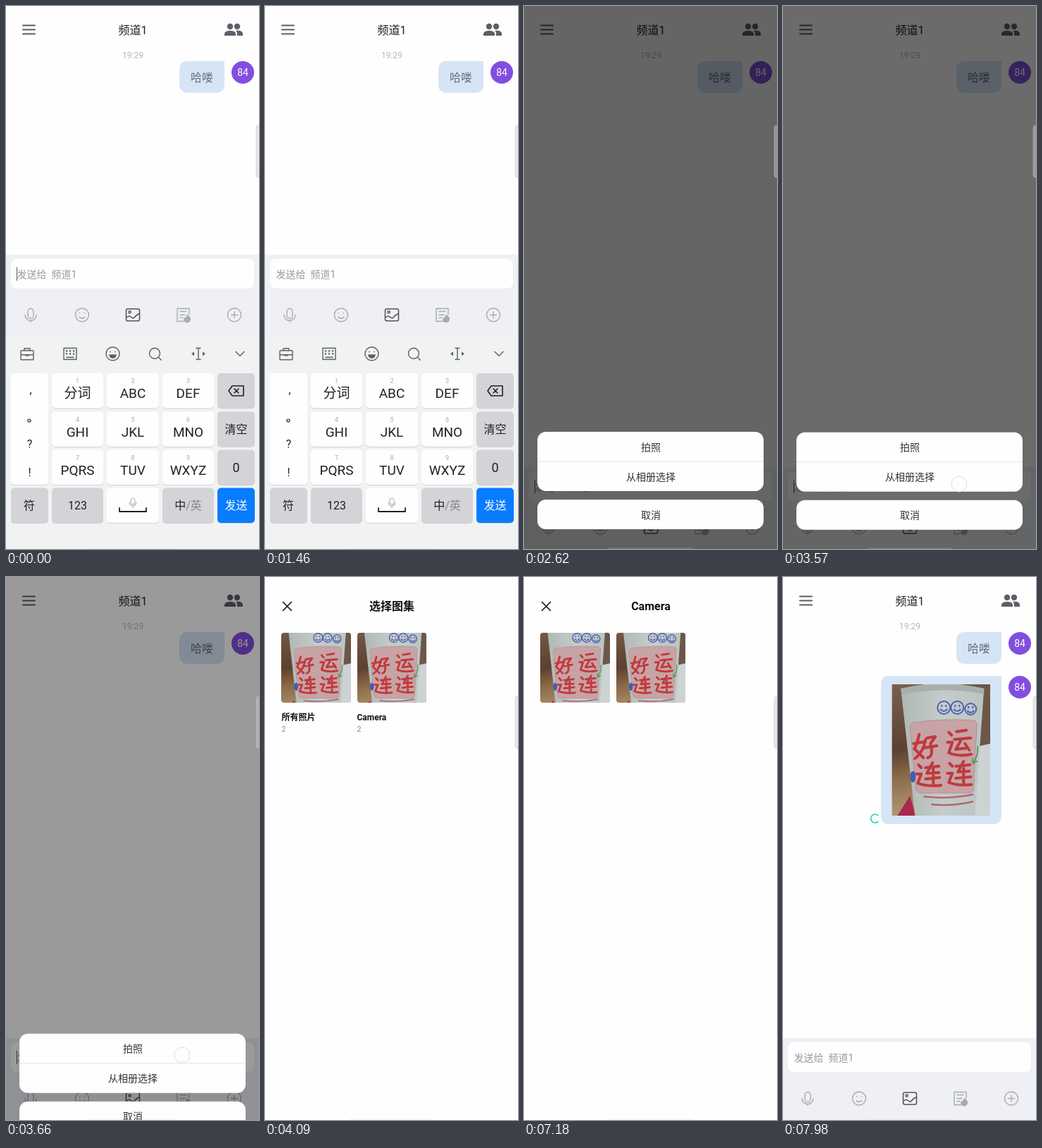
Write an HTML page that moves like this. It is 359 px wide and 769 px high and loops after 8 s.

```html
<!DOCTYPE html>
<html lang="zh-CN">
<head>
<meta charset="utf-8">
<style>
  html, body { margin: 0; width: 100%; height: 100%; overflow: hidden; background: #fefefe; }
  svg { display: block; }
  text { font-family: Roboto, "Noto Sans CJK SC", "Noto Sans CJK", sans-serif; white-space: pre; }
  .line { fill: none; stroke-linecap: round; stroke-linejoin: round; }
  .key { filter: drop-shadow(0 1px .5px #0002); }
</style>
</head>
<body>
<svg id="stage" width="359" height="769" viewBox="0 0 359 769"></svg>
<script>
const LOOP = 8000;
const BAR_DROP = 301;
const stage = document.getElementById('stage');

// Text centred vertically on y
const label = (x, y, size, text, fill = '#333', anchor = 'middle', weight = 400) =>
  `<text x="${x}" y="${y + size * 0.36}" font-size="${size}" fill="${fill}" text-anchor="${anchor}" font-weight="${weight}">${text}</text>`;
const rect = (x, y, w, h, r, fill, extra = '') =>
  `<rect x="${x}" y="${y}" width="${w}" height="${h}" rx="${r}" fill="${fill}" ${extra}/>`;
const line = (d, color, width = 1.4) =>
  `<path class="line" d="${d}" stroke="${color}" stroke-width="${width}"/>`;
const ring = r => `M${-r} 0a${r} ${r} 0 1 1 ${2 * r} 0a${r} ${r} 0 1 1 ${-2 * r} 0`;
const at = (x, y, content) => `<g transform="translate(${x} ${y})">${content}</g>`;
// Rounded on every corner but the top right one
const bubble = (x, y, w, h) =>
  `<path fill="#d6e5f6" d="M${x + 12} ${y}h${w - 12}v${h - 12}q0 12-12 12h${24 - w}q-12 0-12-12v${24 - h}q0-12 12-12"/>`;
const avatar = y => `<circle cx="336" cy="${y}" r="16" fill="#824ee0"/>` + label(336, y, 14, '84', '#fff');

const photo = `
  <symbol id="photo" viewBox="0 0 140 186" preserveAspectRatio="xMidYMid slice">
    <rect width="140" height="186" fill="url(#wood)"/>
    <path d="M110 76h30v110h-30z" fill="#cdd2d3"/>
    <path d="M126 0h14v84l-18 4z" fill="#6c5749"/>
    <path d="M8 186l18-28 8 28z" fill="#a82850"/>
    <path d="M13 6Q70-8 131 6L118 186H33z" fill="url(#cup)"/>
    <path d="M13 6Q70-8 131 6v8Q70 2 14 15z" fill="#a9b0ac"/>
    <path d="M31 54Q72 48 115 51q6 0 6 7L116 148q0 6-7 6H42q-7 0-8-7L26 62q-1-7 5-8z" fill="#c7a3a5" stroke="#b39092"/>
    <g fill="none" stroke="#4c60b5" stroke-width="2">
      <circle cx="74" cy="33" r="9"/><circle cx="93" cy="33" r="9"/><circle cx="112" cy="35" r="8"/>
      <path d="M69 35q5 6 10 0M88 35q5 6 10 0M107 37q5 6 10 0M71 29v3M77 29v3M90 29v3M96 29v3M109 31v3M115 31v3"/>
    </g>
    <ellipse cx="30" cy="131" rx="4" ry="8" fill="#405bb9"/>
    ${line('M122 88q1 14-7 24m0-7v7l6-3', '#4f9c55', 1.8)}
    ${line('M39 71q-4 17-7 20l13 13M48 78q-3 18-15 27M31 84l17-3M50 76l12-2-7 10q5 18-4 20M46 90l18-3', '#c0393c', 4)}
    ${line('M92 67l14-2M89 78l23-2M99 78l-8 14 17-2M104 84l6 9M81 68l4 4M79 82h7l-5 15q14 6 32 2', '#c0393c', 4)}
    ${line('M38 114l4 4M35 127h7l-5 13q12 5 33 3M48 118l19-2M58 111l-8 15 17-1M48 134l20-2M59 120v20', '#c0393c', 4)}
    ${line('M82 112l4 4M79 126h7l-5 13q13 5 32 3M91 116l20-2M102 109l-8 15 16-1M91 133l21-2M102 119v20', '#c0393c', 4)}
    ${line('M46 159q34 4 69-3M57 170q29 3 58-4', '#b0686c', 2.5)}
  </symbol>`;

const defs = `<defs>
  <linearGradient id="wood" x2=".15" y2="1">
    <stop stop-color="#7b604e"/><stop offset=".5" stop-color="#5c4030"/>
    <stop offset=".7" stop-color="#8c6a48"/><stop offset="1" stop-color="#b39a73"/>
  </linearGradient>
  <linearGradient id="cup"><stop stop-color="#b0b8b4"/><stop offset=".5" stop-color="#c5ccc9"/><stop offset="1" stop-color="#bcc4c2"/></linearGradient>
  <clipPath id="tiles">${rect(23, 79, 99, 99, 4)}${rect(131, 79, 98, 99, 4)}</clipPath>
  ${photo}</defs>`;

const header = line('M24 27.5h17M24 33.5h17M24 39.5h17', '#5b5d60', 2)
  + label(180, 34, 16, '频道1', '#222')
  + `<g fill="#5c6068"><circle cx="318" cy="29" r="4.2"/><circle cx="328" cy="29" r="4.2"/>
     <path d="M310 42v-3q1-4 8-4t8 4v3zM328 42v-3q0-3-2-4 9-1 10 4v3z"/></g>`
  + label(180, 70, 12, '19:29', '#b7b7b7');

const messages = bubble(246, 78, 64, 45) + label(278, 101, 16, '哈喽', '#666d76') + avatar(94)
  + `<g id="picture">${bubble(139, 140, 171, 210)}
     <use href="#photo" x="154.5" y="152" width="139.5" height="186"/>${avatar(156)}
     <path id="spinner" class="line" d="M4.3-4.3a6 6 0 1 0 0 8.6" stroke="#28cfc4" stroke-width="1.7"/></g>`;

const pale = '#a9abb0';
const inputBar = `<g id="bar">${rect(0, 352, 359, 117, 0, '#eef0f5')}${rect(7, 358, 345, 42, 8, '#fefefe')}
  ${label(15.5, 379.5, 14, '发送给  频道1', '#999', 'start')}
  ${rect(15, 370, 1, 19, 0, '#555', 'id="caret"')}
  ${at(35, 437.5, line('M-4-5a4 4 0 0 1 8 0v6a4 4 0 0 1-8 0zM-8 0a8 8 0 0 0 16 0M0 8v2', pale))}
  ${at(108, 437.5, line(ring(9.5) + 'M-4 3q4 4 8 0M-3.5-3v.5M3.5-3v.5', pale))}
  ${at(180, 437.5, line('M-7-8.500H7q2.500 0 2.500 2.500V6q0 2.500-2.500 2.500H-7q-2.500 0-2.500-2.500V-6q0-2.500 2.500-2.500M-9.500 4q4-4 7-1t5 0 7-5M-6-4a1.6 1.6 0 1 0 3.200 0a1.6 1.6 0 1 0-3.200 0', '#505257', 1.5))}
  ${at(252, 437.5, line('M8-1v-8H-9V9H0M-5-5H4M-5 0H2M-5 4h4', pale)
    + `<path d="M5-1q6 4 5 8-1 4-5 4t-5-4q0-3 3-4 2-1 2-4" fill="${pale}"/>`)}
  ${at(324, 437.5, line(ring(9.5) + 'M-4.5 0h9M0-4.5v9', pale))}</g>`;

const sheet = `<g id="sheet">${rect(19, 0, 321, 84, 12, '#fefefe')}${rect(19, 41.5, 321, 1, 0, '#e4e4e4')}
  ${rect(19, 96, 321, 42, 12, '#fefefe')}
  ${label(180, 21.5, 14, '拍照')}${label(180, 63.5, 14, '从相册选择')}${label(180, 117.5, 14, '取消')}</g>`;

const columns = [[65, 73], [143, 74], [222, 73], [300, 53]];
const rows = [520, 574.5, 628.5, 682.5];
const grey = '#d3d3d8', ink = '#222', dark = '#5d5f61';
const key = (x, y, w, h, fill) => rect(x, y, w, h, 5, fill, 'class="key"');
const gridKey = (col, row, fill, text, size = 16, color = ink) => {
  const [x, w] = columns[col];
  return key(x, rows[row], w, 49.5, fill) + label(x + w / 2, rows[row] + 25, size, text, color);
};
const letterKeys = ['分词', 'ABC', 'DEF', 'GHI', 'JKL', 'MNO', 'PQRS', 'TUV', 'WXYZ'].map((text, i) => {
  const [x, w] = columns[i % 3], y = rows[Math.floor(i / 3)];
  return key(x, y, w, 49.5, '#fefefe') + label(x + w / 2, y + 11, 9, i + 1, '#aaa')
    + label(x + w / 2, y + 28.5, 19, text, ink);
}).join('');

const keyboard = `<g id="keyboard">${rect(0, 469, 359, 301, 0, '#f1f3f3')}
  ${at(30, 493, line('M-8-5H8q1 0 1 1V7q0 1-1 1H-8q-1 0-1-1V-4q0-1 1-1M-4-5v-3h8v3M-9 1h18M-2 2h4', dark))}
  ${at(91, 492.5, line('M-9-8H9V8H-9zM-5 5H5', dark) + line('M-5-4h.1M0-4h.1M5-4h.1M-5 0h.1M0 0h.1M5 0h.1', dark, 2.4))}
  ${at(151.5, 492.5, line(ring(9.5) + 'M-3.5-3v.5M3.5-3v.5', dark) + `<path d="M-5.5 1h11q-1 5.5-5.5 5.5T-5.5 1" fill="${dark}"/>`)}
  ${at(211, 492, line(ring(7.5) + 'M5.5 5.5l4 4', dark))}
  ${at(273, 492.5, line('M-3-8h6M-3 8h6M0-8V8', dark) + `<path d="M-10 0l4-3v6zM10 0l-4-3v6z" fill="${dark}"/>`)}
  ${at(332, 492.5, line('M-6-3l6 6 6-6', dark))}
  ${key(7, 520, 53, 158, '#fefefe')}
  ${label(35, 543, 16, ',', ink)}
  <circle cx="33" cy="587" r="2" fill="none" stroke="${ink}" stroke-width="1.2"/>
  ${label(33.5, 620, 16, '?', ink)}${label(33.5, 660, 16, '!', ink)}
  ${letterKeys}
  ${gridKey(3, 0, grey, '')}${at(327, 545, line('M-11 0l5-7H10V7H-6zM-3-3l6 6M3-3l-6 6', ink, 1.6))}
  ${gridKey(3, 1, grey, '清空')}${gridKey(3, 2, grey, '0', 18)}
  ${key(7, rows[3], 53, 49.5, grey)}${label(33, 707, 16, '符', ink)}
  ${gridKey(0, 3, grey, '123')}${gridKey(1, 3, '#fefefe', '')}
  ${at(180, 704, line('M-3-4a3 3 0 0 1 6 0v3a3 3 0 0 1-6 0zM-5-1a5 5 0 0 0 10 0M0 4v3', '#b5b5b5', 1.2))}
  ${line('M161 711v5h38v-5', ink, 1.8)}
  ${gridKey(2, 3, grey, '中<tspan fill="#888">/英</tspan>')}
  ${gridKey(3, 3, '#087cff', '发送', 16, '#fff')}</g>`;

const galleryPage = (id, title, captions) => `<g id="${id}">${rect(0, 0, 359, 769, 0, '#fefefe')}
  ${line('M25.5 35.5l12 12M37.5 35.5l-12 12', '#111', 1.6)}
  ${label(180, 41.5, 16, title, '#111', 'middle', 700)}
  <g clip-path="url(#tiles)"><use href="#photo" x="23" y="79" width="99" height="99"/>
  <use href="#photo" x="130.5" y="79" width="99" height="99"/></g>${captions}</g>`;
const albumCaptions = [[23.5, '所有照片'], [130.5, 'Camera']].map(([x, name]) =>
  label(x, 198.5, 12, name, '#111', 'start', 700) + label(x, 215.5, 10.5, '2', '#888', 'start')).join('');

stage.innerHTML = defs + rect(0, 0, 359, 769, 0, '#fefefe') + header + messages + inputBar
  + rect(0, 0, 359, 769, 0, '#000', 'id="shade"') + sheet
  + '<circle id="touch" cx="250" cy="677" r="11" fill="#fefefe" stroke="#ddd"/>' + keyboard
  + galleryPage('albums', '选择图集', albumCaptions) + galleryPage('photos', 'Camera', '')
  + rect(355, 169, 8, 74, 4, '#cecece', 'fill-opacity=".46" stroke="#bbb" stroke-opacity=".5"')
  + rect(119, 767.5, 121, 3, 1.5, '#cecece', 'opacity=".25"');

const part = Object.fromEntries([...stage.querySelectorAll('[id]')].map(node => [node.id, node]));
const progress = (t, start, end) => Math.min(1, Math.max(0, (t - start) / (end - start)));
const smooth = p => p * p * (3 - 2 * p);
const easeOut = p => 1 - (1 - p) ** 3;
const easeInOut = p => p < 0.5 ? 4 * p ** 3 : 1 - 4 * (1 - p) ** 3;
const move = (node, x, y) => node.setAttribute('transform', `translate(${x} ${y})`);
const show = (node, visible) => node.setAttribute('visibility', visible ? 'inherit' : 'hidden');

function render(t) {
  const drop = BAR_DROP * smooth(progress(t, 2160, 2370));
  move(part.bar, 0, drop);
  move(part.keyboard, 0, drop);
  show(part.keyboard, t < 2370);
  show(part.caret, t < 470 || (t >= 930 && t < 1460) || (t >= 1950 && t < 4090));

  const closing = progress(t, 3560, 3860);
  part.shade.setAttribute('opacity', 0.6 * (progress(t, 2270, 2570) - closing));
  const sheetTop = 468 + 135 * easeInOut(progress(t, 2300, 2570));
  move(part.sheet, 0, sheetTop + 166 * smooth(closing));
  show(part.sheet, t >= 2270 && closing < 1);
  show(part.touch, t >= 3510 && t < 3700);

  const albumsIn = easeOut(progress(t, 3720, 4080));
  const photosIn = easeOut(progress(t, 6160, 6700));
  const leaving = smooth(progress(t, 7180, 7560));
  move(part.albums, 359 * (1 - albumsIn), 0);
  show(part.albums, albumsIn > 0 && t < 7180);
  move(part.photos, 359 * (1 - photosIn + leaving), 0);
  show(part.photos, photosIn > 0 && leaving < 1);

  show(part.picture, t >= 7600);
  part.spinner.setAttribute('transform', `translate(130.5 342) rotate(${(t - 7980) * 0.36})`);
}

const begin = performance.now();
function tick() {
  render((performance.now() - begin) % LOOP);
  requestAnimationFrame(tick);
}
tick();
</script>
</body>
</html>
```
